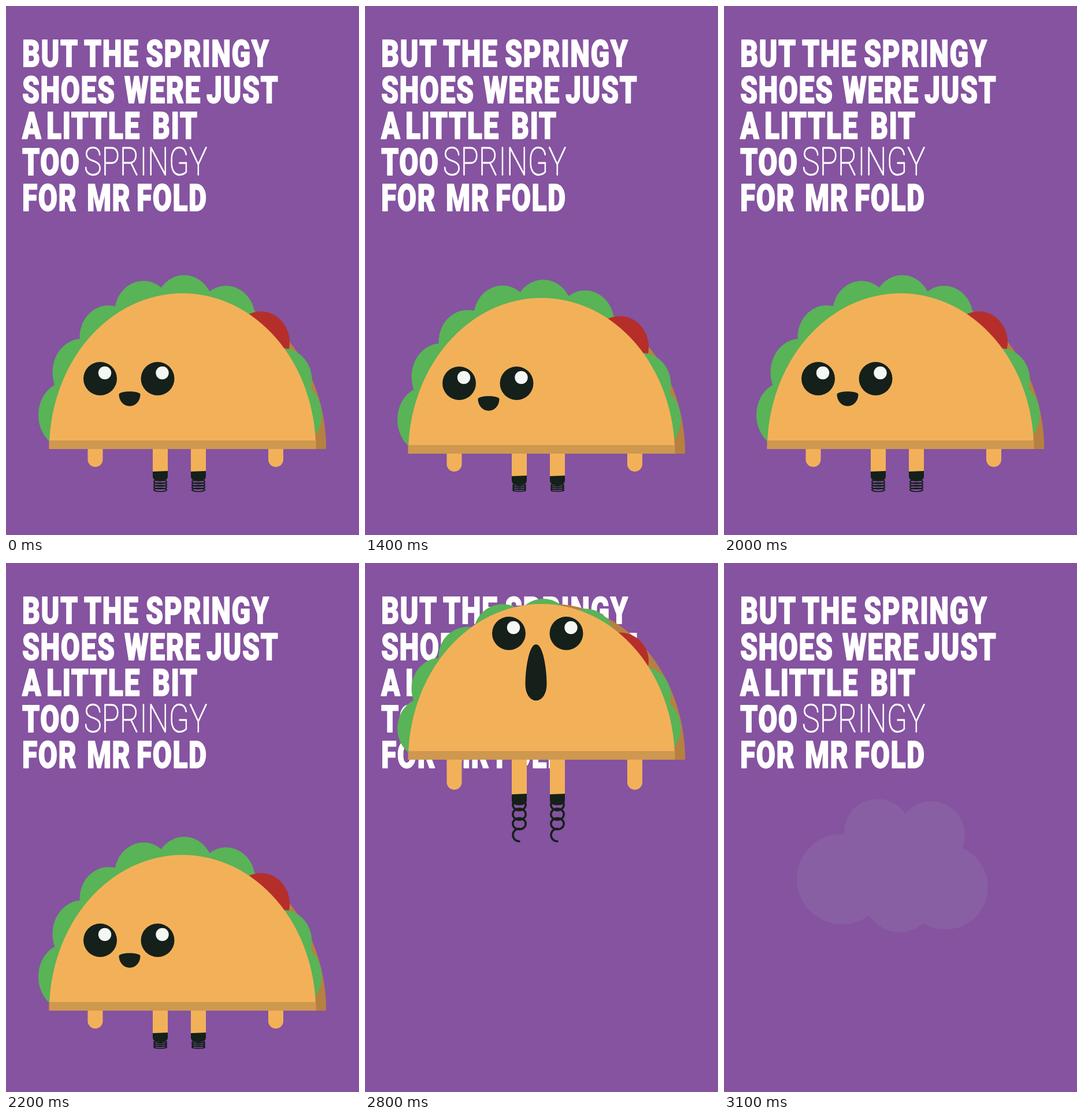
Write an HTML page with a canvas that moves like this. It is 611 px wide and 917 px high and loops after 4.3 s.

```html
<!DOCTYPE html>
<html lang="en">
<head>
<meta charset="utf-8">
<title>Springy shoes</title>
<style>
  html, body { margin: 0; width: 100%; height: 100%; overflow: hidden; background: #8553a0; }
  svg, canvas { position: absolute; left: 0; top: 0; width: 611px; height: 917px; }
  text { font-family: Roboto, "Open Sans", sans-serif; fill: #fff; stroke: #fff; stroke-linejoin: round; }
  .heavy { font-size: 65px; font-weight: 900; stroke-width: 1.8px; letter-spacing: 2px; }
  .thin { font-size: 66px; font-weight: 100; stroke-width: 1.5px; letter-spacing: .5px; }
</style>
</head>
<body>
<svg id="words" viewBox="0 0 611 917"></svg>
<canvas id="stage" width="611" height="917"></canvas>
<script>
const ctx = document.getElementById('stage').getContext('2d');
const LOOP = 4300;
const SHELL = '#f2b159', BAND = '#cf984f', BACK = '#b68041';
const GREEN = '#59b357', RED = '#b52e2a', DARK = '#142019', SHINE = '#f3f8f5';

// Caption: each line has a baseline and its words with their left edges
const lines = [
  [104.5, ['BUT', 28], ['THE', 135], ['SPRINGY', 242]],
  [167.5, ['SHOES', 28], ['WERE', 205], ['JUST', 347]],
  [230, ['A', 28], ['LITTLE', 70], ['BIT', 253]],
  [292.5, ['TOO', 28], ['SPRINGY', 135, 'thin']],
  [355, ['FOR', 28], ['MR', 140], ['FOLD', 226]]
];
const condense = { heavy: .74, thin: .78 };
const svg = document.getElementById('words');
for (const [y, ...words] of lines) {
  for (const [word, x, style = 'heavy'] of words) {
    const el = document.createElementNS(svg.namespaceURI, 'text');
    el.setAttribute('class', style);
    el.setAttribute('transform', `translate(${x} ${y}) scale(${condense[style]} 1)`);
    el.textContent = word;
    svg.append(el);
  }
}

// Vertical values are relative to the bottom edge of the shell, at `base`
const rest = {
  base: 768, filling: 1, limb: 31, leg: 39, faceX: 163, eyeY: -122,
  shoe: 17, coil: 56.8, pitch: 4.6, coilRy: 3, wire: 1.9, shout: false
};
const squat = { ...rest, base: 776, shoe: 16, coil: 54.5, pitch: 3, coilRy: 1.9, wire: 1.8 };
const leap = {
  base: 341, filling: .925, limb: 52, leg: 60, faceX: 249, eyeY: -219,
  shoe: 19, coil: 78, pitch: 16.5, coilRy: 9.8, wire: 3.5, shout: true
};
const away = { ...leap, base: 106 };

function oval(x, y, rx, ry, color) {
  ctx.fillStyle = color;
  ctx.beginPath();
  ctx.ellipse(x, y, rx, ry, 0, 0, Math.PI * 2);
  ctx.fill();
}

function box(x, y, w, h, color) {
  ctx.fillStyle = color;
  ctx.fillRect(x, y, w, h);
}

function halfShell(x, color) {
  ctx.fillStyle = color;
  ctx.beginPath();
  ctx.ellipse(x, 0, 230.7, 270, 0, Math.PI, Math.PI * 2);
  ctx.fill();
}

function filling(stretch) {
  ctx.save();
  ctx.scale(1, stretch);
  const leaf = (x, y, ry) => oval(x, y, 50, ry, GREEN);
  leaf(106, -59, 58);
  leaf(130.5, -133, 58);
  leaf(177.5, -194, 55);
  leaf(238, -237, 54.5);
  leaf(308.5, -247, 54.5);
  leaf(381, -228.5, 54.5);
  oval(441, -185, 50, 53.5, RED);
  leaf(479.5, -120, 54.5);
  leaf(496.5, -60, 57);
  ctx.restore();
}

function arm(x, length) {
  ctx.fillStyle = SHELL;
  ctx.beginPath();
  ctx.roundRect(x, -2, 26, length + 2, [0, 0, 13, 13]);
  ctx.fill();
}

function leg(x, p) {
  const mid = x + 13;
  ctx.strokeStyle = DARK;
  ctx.lineWidth = p.wire;
  ctx.lineCap = 'round';
  for (let i = 0; i < 4; i++) {
    const openEnd = p.shout && i === 3;
    const y = p.coil + i * p.pitch + (openEnd ? 3 : 0);
    ctx.beginPath();
    if (openEnd) ctx.ellipse(mid, y, 11, p.coilRy + 1.2, 0, Math.PI * 1.5, Math.PI / 2, true);
    else ctx.ellipse(mid, y, 11.2, p.coilRy, 0, 0, Math.PI * 2);
    ctx.stroke();
  }
  box(x, -1, 26, p.leg + 3, SHELL);
  ctx.fillStyle = DARK;
  ctx.beginPath();
  ctx.moveTo(x, p.leg);
  ctx.lineTo(x + 26, p.leg - 1);
  ctx.lineTo(x + 26, p.leg + p.shoe - 9);
  ctx.bezierCurveTo(x + 26, p.leg + p.shoe - 3, x + 21, p.leg + p.shoe, mid, p.leg + p.shoe);
  ctx.bezierCurveTo(x + 5, p.leg + p.shoe, x, p.leg + p.shoe - 3, x, p.leg + p.shoe - 9);
  ctx.fill();
}

function face(p) {
  for (const x of [p.faceX, p.faceX + 99.5]) {
    oval(x, p.eyeY, 29, 29, DARK);
    oval(x + 8, p.eyeY - 10, 11.2, 11.2, SHINE);
  }
  ctx.save();
  ctx.fillStyle = DARK;
  ctx.beginPath();
  if (p.shout) {
    ctx.translate(296, -200);
    ctx.moveTo(0, 0);
    ctx.bezierCurveTo(12, 0, 18.5, 42, 18.5, 69);
    ctx.bezierCurveTo(18.5, 86, 10, 97.5, 0, 97.5);
    ctx.bezierCurveTo(-10, 97.5, -18.5, 86, -18.5, 69);
    ctx.bezierCurveTo(-18.5, 42, -12, 0, 0, 0);
  } else {
    ctx.translate(214, -100);
    ctx.moveTo(-18.5, 5);
    ctx.bezierCurveTo(-17, -1.5, 17, -1.5, 18.5, 5);
    ctx.bezierCurveTo(18.5, 17, 10, 25.5, 0, 25.5);
    ctx.bezierCurveTo(-10, 25.5, -18.5, 17, -18.5, 5);
  }
  ctx.fill();
  ctx.restore();
}

function drawTaco(p) {
  ctx.save();
  ctx.translate(0, p.base);
  halfShell(323.5, BACK);
  filling(p.filling);
  arm(141.5, p.limb);
  arm(454, p.limb);
  leg(254, p);
  leg(320, p);
  halfShell(305.5, SHELL);
  box(74.5, -15, 462, 15, BAND);
  face(p);
  ctx.restore();
}

function drawCloud() {
  const puff = (x, y, r) => oval(x, y, r, r, '#885fa2');
  puff(204.5, 548, 78.5);
  puff(266, 467, 58);
  puff(359, 471, 58);
  puff(383.5, 562, 73.5);
  puff(304, 578, 62);
  puff(310, 520, 50);
}

function poseAt(t) {
  if (t < 1000) return rest;
  if (t < 2800) return Math.floor((t - 1000) / 200) % 2 ? rest : squat;
  if (t < 3000) return leap;
  return t < 3100 ? away : null;
}

function tick() {
  const pose = poseAt(performance.now() % LOOP);
  ctx.clearRect(0, 0, 611, 917);
  if (pose) drawTaco(pose);
  else drawCloud();
  requestAnimationFrame(tick);
}
tick();
</script>
</body>
</html>
```
